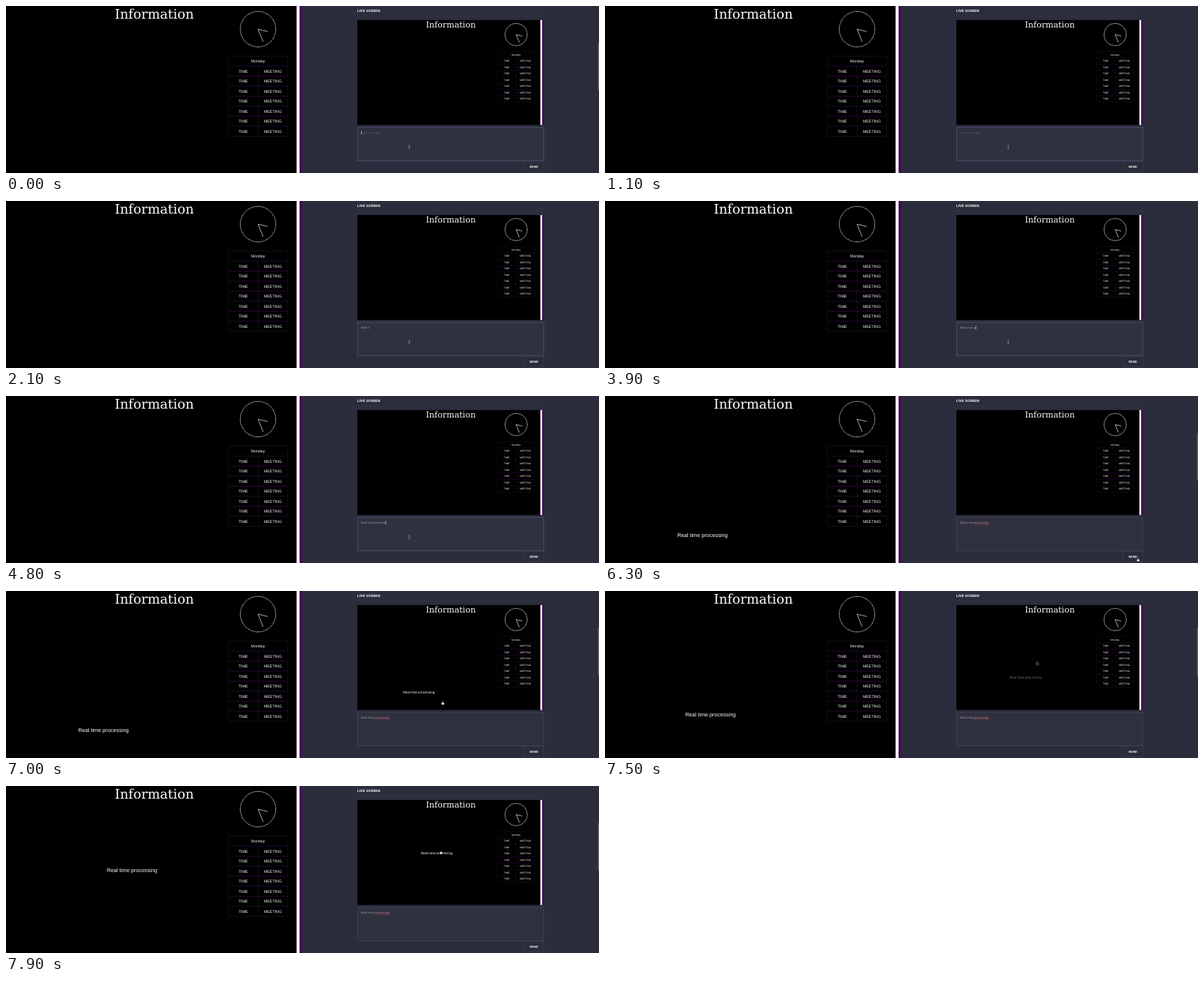
An HTML page that plays this animation: 800 by 225 pixels, repeating every 8 s.

```html
<!DOCTYPE html>
<html lang="en">
<head>
<meta charset="utf-8">
<title>Live screen</title>
<style>
html, body { margin: 0; width: 100%; height: 100%; overflow: hidden; background: #2b2d3d; }
svg { display: block; width: 800px; height: 225px; text-rendering: geometricPrecision; }
.title { font: 17.8px "DejaVu Serif", serif; fill: #fff; text-anchor: middle; }
.cell { font: 5.3px "Liberation Sans", Arial, sans-serif; fill: #f4f4f4; text-anchor: middle; }
.msg { font: 7.3px "Liberation Sans", Arial, sans-serif; fill: #fff; text-anchor: middle; }
.label { font: 700 4.5px Inter, sans-serif; letter-spacing: .15px; fill: #fff; }
.send { font: 700 4px Inter, sans-serif; letter-spacing: .2px; fill: #fff; }
.input { font: 4px "Open Sans", sans-serif; fill: #a2a3ab; white-space: pre; }
.clock { fill: none; stroke: #dccfd2; stroke-width: .6; }
.clock * { vector-effect: non-scaling-stroke; }
.hands { stroke-width: .8; }
</style>
</head>
<body>
<svg viewBox="0 0 800 225">
  <defs><clipPath id="frame"><rect width="400" height="225"/></clipPath></defs>
  <rect width="800" height="225" fill="#2b2d3d"/>
  <g class="screen"></g>

  <text class="label" x="474" y="8.4">LIVE SCREEN</text>
  <path d="M474 13.8H726" stroke="#393b4b" stroke-width=".6"/>
  <g class="screen" transform="translate(474 18.8) scale(.63)"></g>

  <rect id="box" x="474.3" y="163.3" width="251.4" height="45" fill="#30313f" stroke-width=".7"/>
  <text id="hint" class="input" x="479" y="172.2" style="fill:#595b6b">Type message</text>
  <text id="typed" class="input" x="479" y="172.2"></text>
  <path id="spell" d="M497.4 173.2H517.5" stroke="#a84650" stroke-width=".5"/>
  <rect id="caret" y="168.2" width=".7" height="5" fill="#d0d0d8"/>
  <rect x="698.3" y="209.2" width="27.4" height="14" fill="#2a2c3b" stroke="#3d3f50" stroke-width=".7"/>
  <text class="send" x="706.2" y="217.7">SEND</text>
  <rect id="bar" x="798.8" y="50" width="1.2" height="63.5" fill="#6c6d78"/>

  <path id="beam" d="M-1 -2H1M0 -2V2M-1 2H1" fill="none" stroke="#bcbcc6" stroke-width=".5"/>
  <path id="hand" d="M-.8 -2.4q.5 -.5 .9 0v1.6l1.9 .5q.5 .2 .3 .9l-.5 1.8h-2.6l-1.4 -2 .4 -.4 1 .6z"
    stroke-width=".5"/>
  <circle id="grab" r="1.5" fill="#fff"/>
</svg>
<script>
const LOOP = 8000, STEP = 100, PHRASE = "Real time processing";
const SENT = 6300, DRAG = 7200, DROP = 7700;
const $ = id => document.getElementById(id);

const ramp = (t, a, b) => Math.max(0, Math.min(1, (t - a) / (b - a)));
const easeOut = k => 1 - (1 - k) ** 2;
const mix = (from, to, k) => from.map((v, i) => v + (to[i] - v) * k);

function pointer(t) {
  let p = mix([544, 190], [718.5, 210], easeOut(ramp(t, 5300, 5700)));
  p = mix(p, [719, 220.5], ramp(t, 5700, 6100));
  p = mix(p, [563, 137], ramp(t, 6500, 7100));
  return mix(p, [587, 90], easeOut(ramp(t, DRAG, DROP)));
}

const message = (t, power) => mix([131.5, 187.3], [170, 113.2], ramp(t, DRAG, 7900) ** power);

// two bursts of typing with a pause between them
const typedCount = t => Math.floor(9 * ramp(t, 1200, 2300) + 11 * ramp(t, 3600, 5100));

function screen() {
  const cell = (x, y, s) => `<text class="cell" x="${x}" y="${y}">${s}</text>`;
  let table = cell(340, 76.1, "Monday"), rows = "", ticks = "";
  for (let i = 0; i < 7; i++) {
    const y = 81 + i * 13.5;
    table += cell(320, y + 8.7, "TIME") + cell(360, y + 8.7, "MEETING");
    rows += `M300 ${y}H380`;
  }
  for (let i = 0; i < 12; i++)
    ticks += `<path d="M0 -24V-23" transform="rotate(${i * 30})"/>`;
  return `<g clip-path="url(#frame)">
    <rect width="392" height="225"/>
    <rect x="392" width="4" height="225" fill="#fff"/>
    <rect x="396" width="4" height="225" fill="#480a55"/>
    <text class="title" x="200" y="16.5">Information</text>
    <g class="clock" transform="translate(340 31.2)">
      <circle r="24"/>${ticks}
      <path class="hands" d="M13 3.2L0 0L7 17"/>
    </g>
    <path d="M300 67.5H380V175.5H300ZM340 81V175.5" fill="none" stroke="#1e1e1e" stroke-width=".6"/>
    <path d="${rows}" stroke="#360a41" stroke-width=".7"/>
    ${table}
    <text class="msg" dy="2.4">${PHRASE}</text></g>`;
}

const screens = [...document.querySelectorAll(".screen")];
screens.forEach(s => s.innerHTML = screen());
const [left, right] = screens.map(s => s.querySelector(".msg"));

const show = (el, on) => el.style.opacity = +on;
const place = (el, [x, y]) => { el.setAttribute("x", x); el.setAttribute("y", y); };

function draw(t) {
  const count = typedCount(t), sent = t >= SENT, focused = t < SENT - 100;
  const dragging = t >= DRAG && t < DROP;
  const typed = $("typed");
  typed.innerHTML = sent
    ? 'Real time <tspan fill="#cc858c">processing</tspan>'
    : PHRASE.slice(0, count);
  show($("hint"), count === 0);
  show($("spell"), sent);
  show($("caret"), focused && t % 1200 < 600);
  $("caret").setAttribute("x", 479 + (count ? typed.getComputedTextLength() : 0));
  $("box").setAttribute("stroke", focused ? "#525878" : "#434552");
  show($("bar"), 1 - ramp(t, 0, 400) + ramp(t, 5200, 5400));

  // the left screen follows the drag a little late
  show(left, sent);
  place(left, message(t, 1.5));
  show(right, t > SENT && (dragging ? .42 : 1));
  place(right, message(t, 1));

  const kind = t < 5900 ? "beam" : t < DROP ? "hand" : "grab";
  const [x, y] = pointer(t);
  for (const id of ["beam", "hand", "grab"]) {
    show($(id), id === kind);
    $(id).setAttribute("transform", `translate(${x} ${y})`);
  }
  $("hand").setAttribute("fill", dragging ? "#111" : "#fff");
  $("hand").setAttribute("stroke", dragging ? "#888" : "#222");
}

const start = performance.now();
function tick() {
  const t = (performance.now() - start) % LOOP;
  draw(Math.floor(t / STEP) * STEP);
  requestAnimationFrame(tick);
}
tick();
</script>
</body>
</html>
```
